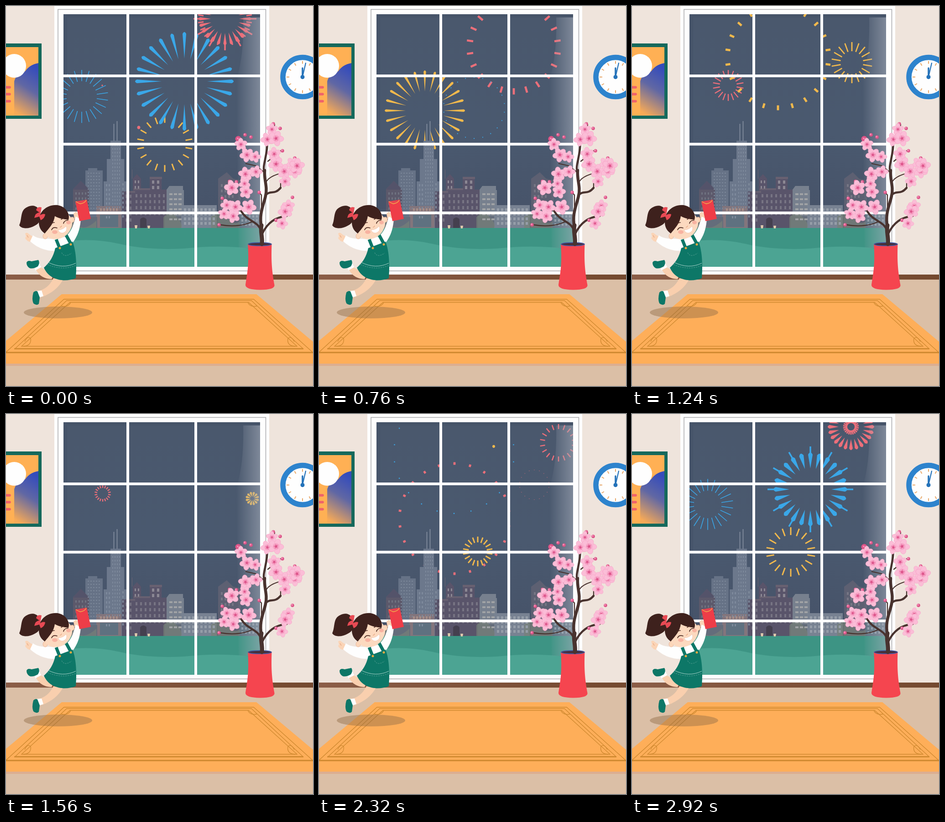
An HTML page for the animation above (2960 ms loop, 673 px wide and 832 px high).

```html
<!DOCTYPE html>
<html>
<head>
<meta charset="utf-8">
<title>Fireworks at the window</title>
<style>
html, body { margin: 0; width: 100%; height: 100%; overflow: hidden; background: #efe4dc; }
svg { display: block; width: 673px; height: 832px; }
</style>
</head>
<body>
<svg viewBox="0 0 673 832">
  <defs>
    <clipPath id="glass"><path d="M126 18H557V571H126Z"/></clipPath>
    <linearGradient id="sky" x2="0" y2="1"><stop stop-color="#4a586d"/><stop offset=".55" stop-color="#4a596f"/><stop offset="1" stop-color="#465268"/></linearGradient>
    <linearGradient id="shine"><stop stop-color="#a9b0bd" stop-opacity="0"/><stop offset="1" stop-color="#a9b0bd" stop-opacity=".55"/></linearGradient>
    <linearGradient id="hill" x1=".6" x2=".3" y2="1"><stop stop-color="#354cbb"/><stop offset=".45" stop-color="#6067a4"/><stop offset="1" stop-color="#f7aa57"/></linearGradient>
    <linearGradient id="skirting"><stop stop-color="#8b5d47"/><stop offset="1" stop-color="#74492f"/></linearGradient>
    <radialGradient id="petal" cy="1"><stop stop-color="#ee6ba0"/><stop offset="1" stop-color="#fbbdd7"/></radialGradient>
    <g id="flower"></g>
  </defs>

  <!-- room -->
  <path fill="#efe4dc" d="M0 0H673V590H0Z"/>
  <path fill="url(#skirting)" d="M0 588H673V599H0Z"/>
  <path fill="#dbbfa6" d="M0 599H673V832H0Z"/>
  <path fill="#fefefe" d="M106 0H577V588H106Z"/>
  <path fill="none" stroke="#a9a9ac" stroke-width="1.5" d="M114 7.5H569.5V580H114Z"/>

  <!-- view -->
  <g clip-path="url(#glass)">
    <path fill="url(#sky)" d="M126 18H557V490H126Z"/>
    <path fill="#425066" opacity=".5" d="M126 18H557V25H134V486H126Z"/>
    <path id="r" fill="#ec6f7a"/><path id="y" fill="#f2b94c"/><path id="b" fill="#3aa7e8"/>
    <g id="city">
      <path stroke="#7d8799" stroke-width="2" d="M236.500 258V296M243.500 252V296"/>
      <path fill="#667286" d="M174 360H180V355H200V360H212V486H174Z"/>
      <path fill="#6c788c" d="M229 295H252V335H259V384H265V486H214V384H221V335H229Z"/>
      <path fill="#5c596b" d="M147 401L164 383L182 401V486H147Z"/>
      <path fill="#54536a" d="M147 402L164 383L182 402Z"/>
      <path fill="#59546a" d="M254 406H278V378L287 368L296 378V400H315V376H341V402H360V486H254Z"/>
      <path fill="#686171" d="M276 358h1v20h-1zM263 405H283V409H263ZM315 374H342V379H315ZM280 399H316V403H280Z"/>
      <path fill="#77808e" d="M352 402L358 394H388V403H390V486H352Z"/>
      <path fill="#788292" d="M384 436H462V486H384Z"/>
      <path fill="#5d6072" d="M465 378L484 364L498 378L515 382V486H465Z"/>
      <path fill="#83757c" d="M198 438H253V486H198Z"/>
      <path fill="#5f7180" d="M206 457H246V484H206ZM512 453H557V486H512Z"/>
      <path fill="#646d7b" d="M126 462H200V486H126ZM348 460H384V486H348Z"/>
      <path fill="#778178" opacity=".7" d="M126 474Q137 450 152 474T198 470V486H126ZM345 486V463Q357 445 373 461T384 486ZM450 486V461Q468 447 484 464T512 472V486Z"/>
      <g id="panes"></g>
      <path fill="#45404f" d="M294 486V467Q301 459 308 467V486Z"/>
    </g>
    <path fill="#3d9484" d="M126 486H557V571H126Z"/>
    <path fill="#4ca493" d="M126 516Q190 507 250 521T390 531Q480 521 557 534V571H126Z"/>
    <path fill="#e1ccae" d="M282 480h6l-1 7h-4zM310 481h6l-1 6h-4z"/>
    <path fill="url(#shine)" d="M505 160Q522 110 520 25H557V530H510Z"/>
  </g>
  <path stroke="#fdfdfe" stroke-width="6" d="M126 153H557M126 302.500H557M126 453H557M267 18V571M416 18V571"/>

  <!-- picture -->
  <path fill="#15695c" d="M0 82H78V247H0Z"/>
  <path fill="#ffb054" d="M0 90H71V240H0Z"/>
  <path fill="url(#hill)" d="M18 240V165Q22 148 42 143Q52 128 71 125V240Z"/>
  <circle cx="18" cy="131" r="26" fill="#fefefe"/>
  <path stroke="#ef626b" stroke-width="5.500" stroke-linecap="round" d="M-4 178H8M-4 193H8M-4 208.500H8"/>

  <!-- clock -->
  <circle cx="650" cy="155.500" r="43" fill="#fefefe" stroke="#2d83cd" stroke-width="11.500"/>
  <path id="ticks" stroke="#e9a869" stroke-width="2"/>
  <g stroke="#2472b9" stroke-linecap="round"><path stroke-width="3.500" d="M650 155V136"/><path stroke-width="2.200" d="M650 155L657 125"/></g>
  <circle cx="650" cy="155.500" r="4.500" fill="#2472b9"/>

  <!-- rug -->
  <path fill="#dcae90" d="M0 780H673V788H0Z"/>
  <path fill="#feae59" d="M122 631H549L673 735V783H0V733Z"/>
  <g fill="none" stroke="#cf8930" stroke-width="1.300">
    <path d="M127 642H543L672 758H0ZM133 645H538L651 750H20ZM140 649H532L638 745H34Z"/>
    <path stroke-width="2.500" d="M18 750.500H652M0 759H673"/>
    <path d="M38 745Q56 744 54 728Q47 721 41 735M634 745Q615 744 618 728Q625 721 632 735M121 657Q137 660 142 649M550 657Q535 660 530 649"/>
  </g>

  <!-- plant -->
  <path fill="#f5454f" d="M530 521C533 560 530 580 525 610Q524 621 557 621.500Q590 621 588.500 611C583 580 581 560 582.500 521Z"/>
  <ellipse cx="556.500" cy="521.500" rx="25.500" ry="3.500" fill="#49303d" stroke="#3e58a8" stroke-width="1.500"/>
  <g fill="none" stroke="#49332f" stroke-linecap="round">
    <path stroke-width="9" d="M561 521C563 507 557 495 560 480"/>
    <path stroke-width="6.500" d="M560 484C554 455 565 435 569 416C574 395 565 380 567 360"/>
    <path stroke-width="4.500" d="M567 365C560 350 574 330 573 292M559 492C552 470 528 472 515 448M562 498C573 475 590 462 615 460M568 415C580 402 588 415 602 398"/>
    <path stroke-width="2.300" d="M541 472Q510 486 470 479M567 365L548 350L526 345M574 340L602 317M573 300L589 260M602 400V388M560 443V414L555 408M590 467L608 474M569 388Q575 372 608 365"/>
  </g>
  <g id="blossom"></g>

  <!-- girl -->
  <ellipse cx="114" cy="671" rx="75" ry="13" fill="#916d48" opacity=".45"/>
  <path fill="#f9cfae" d="M104 588L69 568L66 578Q76 597 100 598ZM104 596Q92 620 70 624L79 637Q111 625 125 599Z"/>
  <path fill="#fefefe" d="M60 562L72 560L77 572L64 579ZM66 624L78 623L82 635L69 640Z"/>
  <path fill="#0d7767" d="M45 562Q47 556 56 559L71 556Q75 562 70 570Q60 576 52 574Q45 570 45 562ZM60 627Q65 622 69 625L74 638L72 652Q67 657 60 651Q56 642 60 627Z"/>
  <path fill="#fbd4b6" d="M42 498Q46 494 51 500L59 505L58 515Q49 518 45 512Q40 508 44 505ZM150 466L148 454L154 450L163 462L162 470Z"/>
  <path fill="#fefefe" d="M59 502C75 514 95 507 112 512L132 503C145 493 148 476 153 461L164 467C162 490 157 504 145 520L110 536C86 538 64 526 53 515Z"/>
  <path fill="#0d7767" d="M108 530L146 516C155 540 155 573 153 596C130 605 96 602 83 573C96 561 104 549 108 530Z"/>
  <path fill="none" stroke="#0d7767" stroke-width="7" d="M110 511L118 531M132 502L143 522"/>
  <path fill="none" stroke="#a9d3ca" stroke-width="1" d="M92 561Q124 577 153 563"/>
  <path fill="none" stroke="#6fada2" stroke-width=".8" stroke-dasharray="3 2" d="M91 566Q124 580 153 568M122 540Q128 552 144 541"/>
  <g fill="#e9a941"><circle cx="118" cy="530" r="2.500"/><circle cx="142" cy="522" r="2.500"/></g>
  <path fill="#ee3d48" d="M152 428L177 424L186 466L161 471Z"/>
  <path fill="#e64450" stroke="#f3b34c" stroke-width="1.500" d="M153 428Q159 432 163 433Q172 432 176 425"/>
  <path fill="#3e211d" d="M74 459C76 440 61 433 47 440C30 447 36 466 29 480C34 489 52 488 63 481C72 477 76 470 74 459Z"/>
  <g fill="#fcd6b9" stroke="#e5a887" stroke-width=".7"><ellipse cx="86" cy="504" rx="5" ry="6"/><ellipse cx="145" cy="468" rx="5" ry="6"/></g>
  <path fill="#fcd9bf" d="M82 490C81 462 96 448 115 448C136 448 149 466 144 483C138 502 121 513 102 510Q86 506 82 490Z"/>
  <path fill="#3e211d" d="M72 474C70 450 91 434 113 436C132 439 141 456 137 468C127 467 115 465 107 460C105 476 94 487 85 498C76 492 72 483 72 474Z"/>
  <path fill="#e84a54" d="M73 452Q64 453 62 464L73 461L76 469Q85 465 86 456Q80 454 75 458L78 441Q68 438 66 447Z"/>
  <g fill="#f7a697" opacity=".75"><ellipse cx="107" cy="495" rx="6" ry="4"/><ellipse cx="137" cy="474" rx="5" ry="4"/></g>
  <path fill="none" stroke="#4b2921" stroke-width="1.700" stroke-linecap="round" d="M100 490Q103 483 112 486M126 476Q128 469 136 469M98 477Q102 474 106 474M121 467L127 464"/>
  <path fill="#fff" stroke="#f0b69a" stroke-width=".6" d="M114 490Q123 491 132 482Q136 493 125 497Q117 498 114 490Z"/>
  <path fill="none" stroke="#e6a47f" stroke-width="1.200" d="M118 484Q121 485 122 481M46 502L49 507"/>
</svg>
<script>
const LOOP = 2960, STEP = 40, TAU = Math.PI * 2;
const $ = id => document.getElementById(id);
const range = n => [...Array(n).keys()];
const pairs = s => s.split(' ').map(p => p.split(',').map(Number));

function polar(x, y, a, r, side = 0) {
  const c = Math.cos(a), s = Math.sin(a);
  return (x + r * c - side * s).toFixed(1) + ' ' + (y + r * s + side * c).toFixed(1);
}

// Static details built by rule
$('ticks').setAttribute('d', range(12).map(i =>
  `M${polar(650, 155.5, i * TAU / 12, 29)}L${polar(650, 155.5, i * TAU / 12, 35)}`).join(''));

function panes(x, y, cols, rows, dx, dy, w, h, fill) {
  const d = range(cols * rows).map(i =>
    `M${x + i % cols * dx} ${y + Math.floor(i / cols) * dy}h${w}v${h}h${-w}z`).join('');
  return `<path fill="${fill}" d="${d}"/>`;
}
$('panes').innerHTML =
  panes(179, 365, 5, 12, 6, 7, 3, 2, '#7b8799') + panes(233, 303, 4, 18, 5, 8, 2, 4, '#7d899b') +
  panes(219, 390, 2, 8, 6, 10, 3, 5, '#7d899b') + panes(255, 388, 1, 8, 6, 10, 3, 5, '#7d899b') +
  panes(152, 408, 4, 6, 7, 11, 3, 5, '#6f7280') + panes(262, 413, 2, 5, 9, 13, 4, 7, '#777483') +
  panes(282, 382, 2, 2, 7, 12, 3, 6, '#8b8793') + panes(284, 412, 7, 4, 10, 13, 4, 7, '#777483') +
  panes(320, 382, 2, 2, 11, 12, 5, 7, '#8b8793') + panes(358, 410, 3, 6, 10, 11, 7, 4, '#a0a2a5') +
  panes(390, 443, 8, 4, 9, 10, 5, 6, '#959da8') + panes(471, 390, 4, 7, 8, 12, 4, 6, '#767684') +
  panes(206, 443, 6, 1, 7, 8, 4, 6, '#a48d88') + panes(516, 458, 5, 3, 8, 9, 4, 5, '#8f9ba7');

$('flower').innerHTML = range(5).map(i =>
  `<ellipse cy="-8" rx="6" ry="8" fill="url(#petal)" stroke="#f6a3c5" stroke-width=".6" transform="rotate(${i * 72})"/>`).join('') +
  '<circle r="2.400" fill="#d6437c"/><path stroke="#e2689a" stroke-width=".7" d="M0 0L-4-5M0 0L4-5M0 0L0 6M0 0L-6 2M0 0L6 2"/>';
const flowers = pairs('583,270 573,292 592,290 515,303 528,326 546,330 588,324 592,346 548,363 525,368 523,389 526,407 495,398 628,345 610,362 612,384 633,362 638,350 484,436 503,440 478,455 498,460 532,440 619,438 612,450 605,476');
const buds = pairs('509,291 586,258 606,317 633,333 647,347 628,419 467,479 474,421 524,282 555,408 601,268 490,384 505,385 537,287 592,469');
$('blossom').innerHTML = buds.map(([x, y], i) =>
  `<circle cx="${x}" cy="${y}" r="${i ? 3.8 : 6.5}" fill="#dc5487"/><circle cx="${x - 1}" cy="${y - 1}" r="2" fill="#f28ab3"/>`).join('') +
  flowers.map(([x, y], i) =>
    `<use href="#flower" transform="translate(${x} ${y}) rotate(${i * 47}) scale(${0.82 + i * 7 % 5 * 0.06})"/>`).join('');

// Rings of dashes: colour, x, y, radius, start, life, tail
const rings = [
  ['b', 340, 223, 68, 382, 400, .83], ['r', 291, 266, 125, 2956, 520, .83],
  ['r', 211, 174, 44, 2956, 420, .6], ['r', 211, 174, 44, 1070, 440, .5],
  ['r', 212, 174, 44, 1490, 440, .8], ['r', 427, 90, 125, 528, 520, .83],
  ['y', 320, 112, 125, 935, 520, .83], ['b', 341, 125, 125, 1608, 520, .83],
  ['b', 296, 86, 133, 1810, 520, .83], ['r', 297, 229, 125, 1920, 520, .83],
  ['y', 383, 71, 125, 2317, 520, .83], ['y', 482, 124, 58, 1068, 440, .5],
  ['y', 474, 282, 50, 1745, 440, .65], ['r', 525, 63, 50, 2129, 440, .66],
  ['r', 472, 155, 33, 1915, 420, .8], ['y', 348, 301, 65, 2258, 300, .68],
  ['y', 348, 302, 65, 2808, 250, .6], ['b', 166, 198, 62, 2585, 625, .42],
  ['r', 480, 28, 67, 2911, 95, .7]
];

// Petal bursts: keys hold age, inner radius, outer radius, width, tip
const bursts = [
  { c: 'b', x: 391, y: 165, start: 2760, keys: [[0, 0, 0, 7, 0], [60, 10, 40, 9, 0], [160, 46, 81, 10, 13], [200, 50, 108, 8, 0], [440, 88, 116, 2, 0], [520, 115, 116, 0, 0]] },
  { c: 'r', x: 480, y: 28, start: 2860, keys: [[0, 0, 0, 7, 0], [60, 27, 51, 8, 0], [100, 31, 58, 7, 11], [220, 50, 95, 4, 0], [500, 68, 110, 1, 0], [600, 108, 112, .3, 0]] },
  { c: 'y', x: 232, y: 229, start: 330, late: 150, keys: [[0, 0, 0, 5, 0], [70, 28, 58, 6, 0], [430, 42, 88, 5.5, 0], [560, 75, 93, 2, 0], [630, 93, 94, 0, 0]] },
  { c: 'y', x: 540, y: 185, start: 1540, odd: true, keys: [[0, 0, 0, 5, 0], [100, 18, 75, 6, 0], [300, 38, 103, 1.7, 0], [420, 98, 106, .5, 0]] }
];

const ease = p => 1 - (1 - Math.max(0, p)) ** 3;
const ageAt = (t, start) => (t - start + LOOP) % LOOP;

function bar(x, y, a, inner, outer, w) {
  return `M${polar(x, y, a, inner, w / 2)}L${polar(x, y, a, outer, w / 2)}L${polar(x, y, a, outer, -w / 2)}L${polar(x, y, a, inner, -w / 2)}Z`;
}
function petal(x, y, a, inner, outer, w) {
  const r = Math.max(inner, outer - w / 2);
  return `M${polar(x, y, a, inner)}L${polar(x, y, a, r, w / 2)}Q${polar(x, y, a, outer + w / 2)} ${polar(x, y, a, r, -w / 2)}Z`;
}

function ringPath([c, x, y, R, start, life, tail], t) {
  const p = ageAt(t, start) / life;
  if (p >= 1) return '';
  const n = R > 66 || c === 'b' ? 22 : 18;
  const w = (1 + R * .03) * (tail < .45 ? .55 : 1) * Math.min(1, (1 - p) * 4 + .4);
  const outer = R * ease(p);
  const inner = Math.max(0, Math.min(R * ease(p * tail - .025), outer - w));
  return range(n).map(i => bar(x, y, i * TAU / n - TAU / 4, inner, outer, w)).join('');
}

function burstPath({ x, y, start, keys, late = 0, odd }, t) {
  const age = ageAt(t, start);
  const next = keys.findIndex(k => k[0] > age);
  if (next < 1) return '';
  const from = keys[next - 1], to = keys[next];
  const f = (age - from[0]) / (to[0] - from[0]);
  const [, inner, outer, w, tip] = from.map((v, i) => v + (to[i] - v) * f);
  return range(24).map(i => {
    if (i % 2 ? age < late : odd) return '';
    const a = i * TAU / 24;
    let d = petal(x, y, a, inner, outer, w);
    if (tip && i % 2 === 0) d += bar(x, y, a, outer - 3, outer + tip, 3.5);
    return d;
  }).join('');
}

function frame(now) {
  const t = Math.floor(now % LOOP / STEP) * STEP;
  const d = { r: '', y: '', b: '' };
  for (const ring of rings) d[ring[0]] += ringPath(ring, t);
  for (const burst of bursts) d[burst.c] += burstPath(burst, t);
  for (const c in d) $(c).setAttribute('d', d[c]);
}

const begin = performance.now();
function tick() {
  frame(performance.now() - begin);
  requestAnimationFrame(tick);
}
tick();
</script>
</body>
</html>
```
